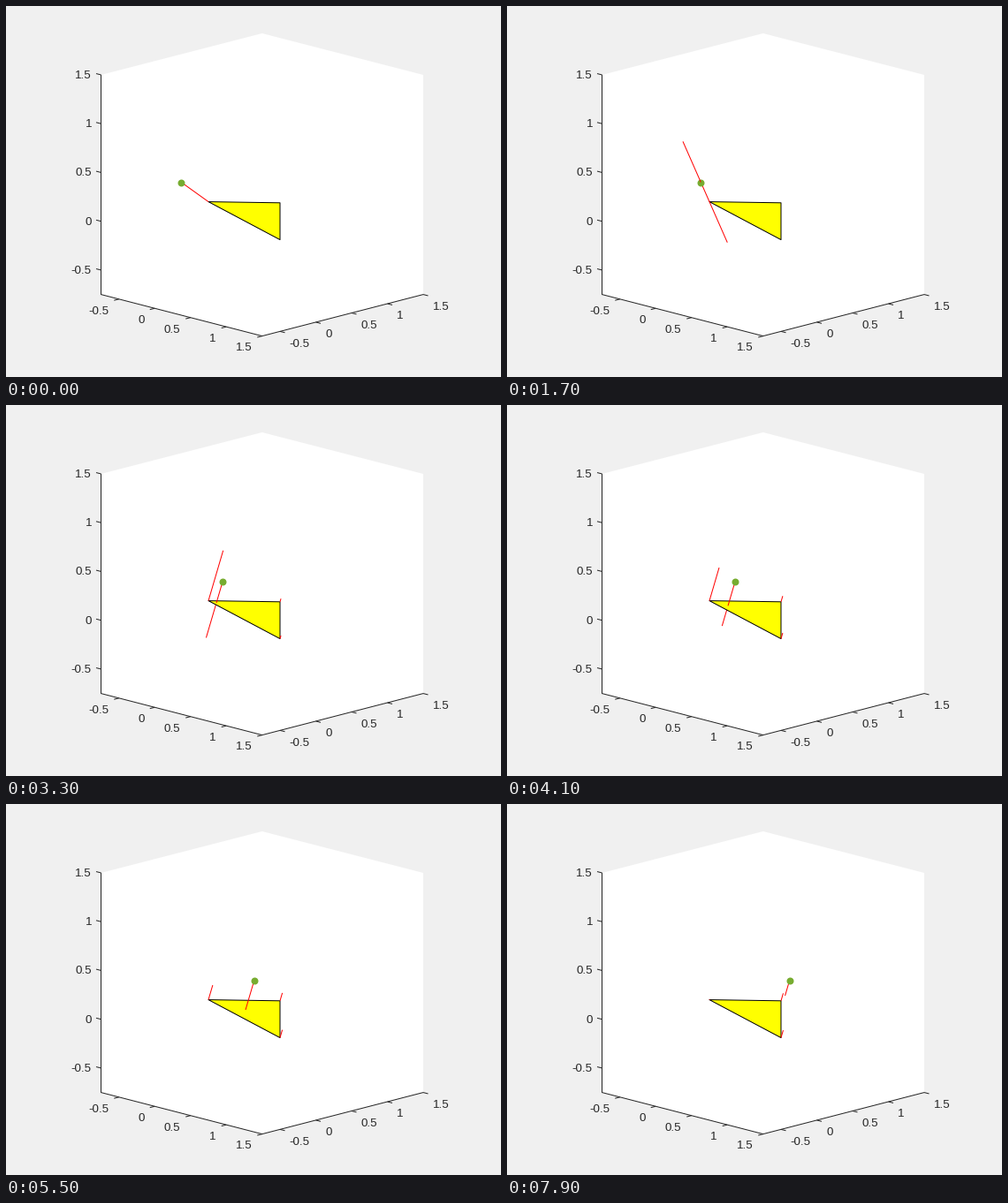
Animation of 560x420 px, one loop 8 s. Source, as a matplotlib script:

```python
import numpy as np
import matplotlib.pyplot as plt
from matplotlib.animation import FuncAnimation

W, H, DPI = 560, 420, 100
PX = 72 / DPI                      # points per pixel
LO, HI = -0.75, 1.5
INK = (0.15, 0.15, 0.15)
TICKS = [(-0.5, "-0.5"), (0, "0"), (0.5, "0.5"), (1, "1"), (1.5, "1.5")]

fig = plt.figure(figsize=(W / DPI, H / DPI), dpi=DPI, facecolor="#f0f0f0")
ax = fig.add_axes([0, 0, 1, 1])
ax.set_xlim(0, W)
ax.set_ylim(H, 0)
ax.axis("off")


def project(p):
    """Orthographic view from 45 degrees, in stage pixels."""
    x, y, z = p
    return np.array([229 + 81 * (x + y), 243.7 + 20.9 * (x - y) - 110.5 * z])


def stroke(points, color, width=1.0, z=1):
    xy = np.array(points)
    return ax.plot(xy[:, 0], xy[:, 1], color=color, lw=width * PX, zorder=z,
                   solid_capstyle="butt")[0]


def tick(p, step, shift, label, align):
    start = project(p)
    stroke([start, start + step], INK)
    x, y = start + shift
    ax.text(x, y + 4.7, label, ha=align, va="baseline", color=INK,
            family="Liberation Sans", fontsize=13.33 * PX)


def draw_box():
    rim = [(LO, LO, HI), (LO, HI, HI), (HI, HI, HI),
           (HI, HI, LO), (HI, LO, LO), (LO, LO, LO)]
    ax.add_patch(plt.Polygon([project(p) for p in rim], fc="white", ec="none", zorder=0))
    axes_path = [(LO, LO, HI), (LO, LO, LO), (HI, LO, LO), (HI, HI, LO)]
    stroke([project(p) for p in axes_path], INK)
    for v, label in TICKS:
        tick((v, LO, LO), (-5.5, 1.4), (-11.5, 12.2), label, "right")
        tick((HI, v, LO), (5.5, 1.4), (10.5, 12.7), label, "left")
        tick((LO, LO, v), (-5.5, -1.4), (-10.5, -0.8), label, "right")


draw_box()

corners = np.array([(0, 0, 0.2), (0, 1, 0), (1, 0, 0)], float)
ax.add_patch(plt.Polygon([project(c) for c in corners], fc="#ffff00", ec="black",
                         lw=PX, joinstyle="round", zorder=3))

blank = [(0, 0), (0, 0)]
buried = stroke(blank, "red", z=2)
push = stroke(blank, "red", z=4)
reactions = [stroke(blank, "red", z=6) for _ in corners]
dot, = ax.plot([], [], "o", color="#77ac30", ms=8 * PX, mew=0, zorder=5)


def place(line, a, b):
    line.set_data(*np.array([project(a), project(b)]).T)


def repulsion(d):
    return 0.01024 / d**2 + 0.1627 / d - 0.295


def update(n):
    t = -0.19 + 0.01 * max(0, n - 4)
    p = np.array([t, t, 0.4])

    # closest point of the triangle: the apex first, then the face
    f = max(0.0, t - 0.2 * (0.4 * t + 0.2) / 1.08)
    foot = np.array([f, f, 0.2 - 0.4 * f])
    gap = foot - p
    d = np.linalg.norm(gap)
    ratio = repulsion(d) / d
    force = gap * ratio

    for line, c, w in zip(reactions, corners, (1 - 2 * f, f, f)):
        place(line, c, c - w * force)
    if f > 0:
        # the part past the foot runs behind the face
        place(push, p, p + gap * min(1, ratio))
        place(buried, foot, p + gap * max(1, ratio))
    else:
        # both lines are collinear, so meet at the dot instead of overlapping
        place(push, p, p + gap * max(1, ratio))
        place(buried, p, p)
        place(reactions[0], p, p + gap * min(0, 1 - ratio))

    x, y = project(p)
    dot.set_data([x], [y])
    return [buried, push, dot, *reactions]


anim = FuncAnimation(fig, update, frames=80, interval=100, repeat=True,
                     repeat_delay=0, blit=False)
plt.show()
```
